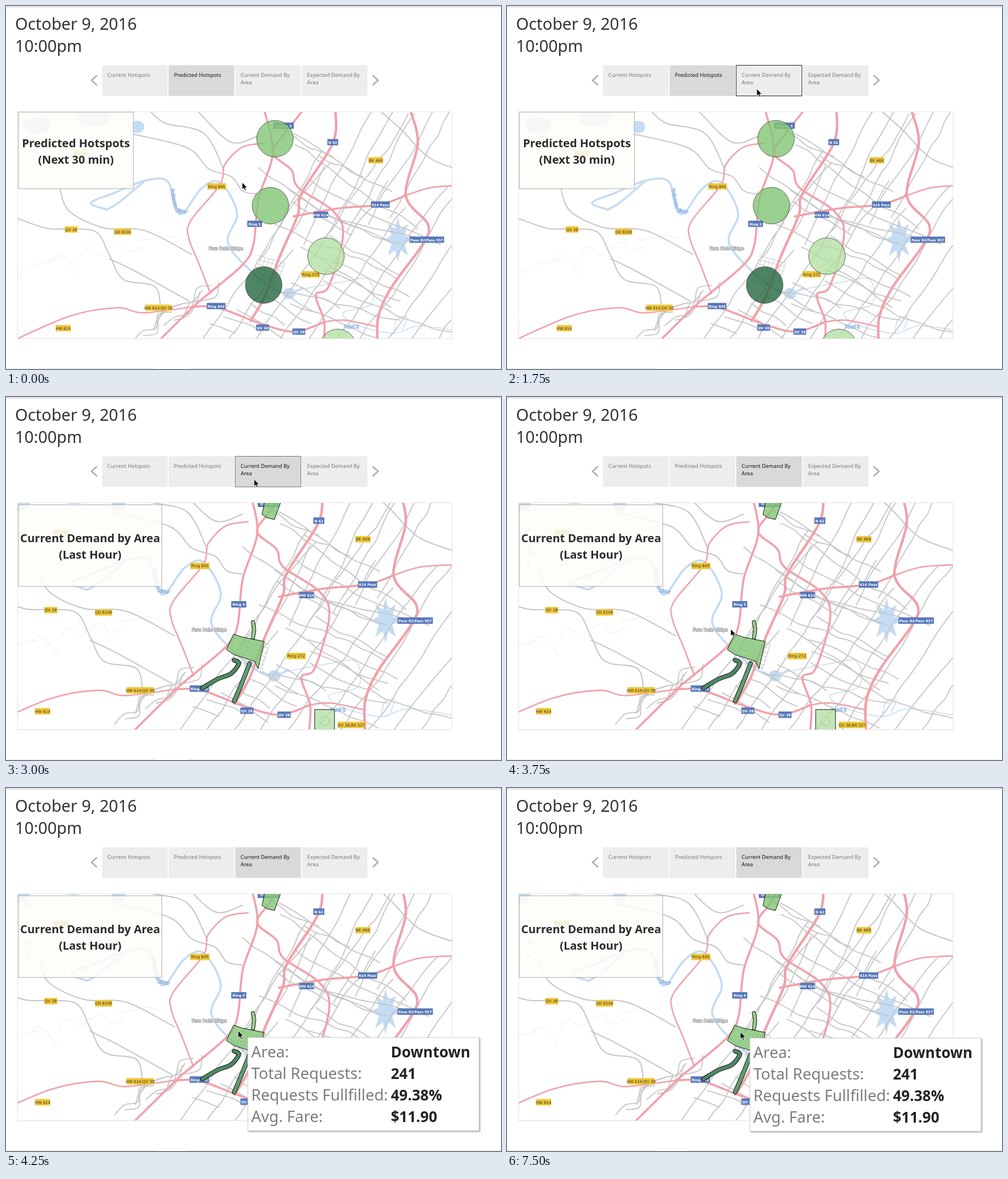
An HTML page that plays this animation: 874 px wide and 640 px high, repeating every 8000 ms.

```html
<!DOCTYPE html>
<html lang="en">
<head>
<meta charset="utf-8">
<title>Demand map</title>
<style>
html, body { margin: 0; width: 100%; height: 100%; overflow: hidden; background: #fff; }
svg { display: block; font-family: "Noto Sans", "Open Sans", sans-serif; }
.line { fill: none; stroke-linecap: round; stroke-linejoin: round; }
.sign, .place { font-family: "DejaVu Sans", sans-serif; text-anchor: middle; }
.place { font-size: 7.6px; fill: #fff; stroke: #999; stroke-width: 1.7px; paint-order: stroke; }
.water { stroke: #7ba6dc; }
.tab { font-size: 9.3px; fill: #777; }
.title { font-size: 20px; font-weight: 600; text-anchor: middle; fill: #2b2b2b; }
.key { font-size: 27.5px; font-weight: 300; fill: #7c7c7c; }
.value { font-size: 26px; font-weight: 600; fill: #222; }
</style>
</head>
<body>
<svg width="874" height="640" viewBox="0 0 874 640">
  <defs>
    <clipPath id="frame"><rect x="21" y="187" width="767" height="399"/></clipPath>
    <linearGradient id="edge" x2="0" y2="1"><stop stop-color="#ddd"/><stop offset="1" stop-color="#fff"/></linearGradient>
    <filter id="shadow"><feDropShadow dx="1.5" dy="1.5" stdDeviation="1.2" flood-opacity=".4"/></filter>
  </defs>
  <rect width="874" height="5" fill="url(#edge)"/>
  <path d="M0 639.5H264M320 639.5H874" stroke="#e4e4e4"/>
  <g font-size="28.8" fill="#333"><text x="16" y="42">October 9, 2016</text><text x="16" y="81">10:00pm</text></g>
  <path class="line" d="M160 123L151 131L160 139M648 123L657 131L648 139" stroke="#adadad" stroke-width="2.4"/>
  <g id="tabs"></g>
  <g clip-path="url(#frame)">
    <g id="map"></g>
    <g id="spots" stroke="#333" stroke-opacity=".75"></g>
    <g id="areas" stroke="#111" stroke-linejoin="round"></g>
  </g>
  <rect x="20.5" y="186.5" width="767" height="400" fill="none" stroke="#e2e2e2"/>
  <g id="tools" fill="none" stroke="#aaa" stroke-width="1.2">
    <circle cx="39" cy="203" r="3.5"/>
    <path d="M36.5 206L33.5 209.5M38.5 230V238M34.5 234H42.5M35 268H41L39 272H37ZM38 272V277M42 273L46 277M46 273L42 277M36.5 293.5L41 297L36.5 300.5Z"/>
  </g>
  <g id="titles"></g>
  <g id="tip"><rect width="408" height="164" fill="#fff" stroke="#ccc" filter="url(#shadow)"/></g>
  <path id="cursor" d="M0 0V12.5L2.9 9.9L5 14.5L7 13.6L5 9.2H8.9Z" stroke="#fff" stroke-width=".8"/>
</svg>
<script>
const $ = id => document.getElementById(id);
const map = $("map"), areas = $("areas");
const blue = "#c4dcf4", grey = "#c6c6c6", pink = "#f1a1aa";

let seed = 11;
const random = (lo, hi) => {
  seed = (seed * 1664525 + 1013904223) % 4294967296;
  return lo + (hi - lo) * seed / 4294967296;
};

function add(parent, tag, attrs, text = "") {
  const el = document.createElementNS("http://www.w3.org/2000/svg", tag);
  for (const k in attrs) el.setAttribute(k, attrs[k]);
  el.textContent = text;
  return parent.appendChild(el);
}

// Smooth path through [x, y] points
function curve(p) {
  let d = "M" + p[0];
  for (let i = 0; i < p.length - 1; i++) {
    const a = p[i - 1] || p[i], b = p[i], c = p[i + 1], e = p[i + 2] || c;
    const pull = (u, v, w) => [0, 1].map(k => u[k] + (w[k] - v[k]) / 6);
    d += `C${pull(b, a, c)} ${pull(c, e, b)} ${c}`;
  }
  return d;
}
const line = (parent, stroke, width, points) =>
  add(parent, "path", { class: "line", d: curve(points), stroke, "stroke-width": width });
const parse = text => text.split(" ").map(s => s.split(",").map(Number));
const road = (stroke, width, text) => line(map, stroke, width, parse(text));

// Street that wanders around one heading, in degrees
function wander(x, y, heading, length, sway = 12, stroke = grey, width = 1.8) {
  const points = [[x, y]];
  for (let s = 0; s < length; s += 24) {
    const a = (heading + random(-sway, sway)) * Math.PI / 180;
    points.push([x += 24 * Math.cos(a), y += 24 * Math.sin(a)]);
  }
  line(map, stroke, width, points);
}

// Water
road(blue, 3.6, "178,359 150,347 190,330 245,308 285,309 300,358 314,364 345,322 378,311 408,365 392,418 440,474 490,507 524,497");
road(blue, 3.6, "178,359 200,346 245,308");
road(blue, 1.5, "520,500 590,487 640,482 645,525 595,541 622,563 685,577 730,564 810,575");
road(blue, 1.5, "685,577 690,553 708,548 700,571");
const lake = Array.from({ length: 16 }, (_, i) => {
  const a = i * Math.PI / 8, r = i % 2 ? 0.5 : 1;
  return [692 + 25 * r * Math.sin(a), 412 - 40 * r * Math.cos(a)];
});
add(map, "polygon", { points: lake.join(" "), fill: blue });
[[232, 213, 12], [55, 210, 24], [155, 197, 30], [500, 507, 11]].forEach(([cx, cy, rx]) =>
  add(map, "ellipse", { cx, cy, rx, ry: Math.min(rx, 16) * .9, fill: blue }));
for (let i = 0; i < 5; i++) wander(25 + i * 52, 470 - i * 14, 8, 70, 65, "#e6eff8", 1);

// Town streets: a slanted grid, then the small downtown blocks
for (let i = 0; i < 10; i++) wander(335 + i * 46, 605, -54, random(190, 500), 9);
for (let i = 0; i < 7; i++) wander(450 + i * 38, 445 - i * 12, -61, random(150, 330), 8);
for (let i = 0; i < 17; i++) wander(random(440, 590), 205 + i * 20, random(15, 32), random(90, 260));
for (let i = 0; i < 7; i++) wander(360 + i * 24, 560 - i * 12, 28, random(40, 110));
for (let i = 0; i < 7; i++) {
  wander(434 + i * 7, 488 + i * 2, -70, 44, 2, grey, 1);
  wander(446 - i * 2, 440 + i * 7, 16, 44, 2, grey, 1);
}

// Country roads
for (let i = 0; i < 6; i++) wander(225 + i * 18, 590 - i * 9, -48, random(60, 130), 40);
["21,375 72,392 115,393 160,399 183,440 207,482 262,494 273,530",
 "95,322 112,362 172,391 245,396 328,438",
 "225,226 320,250 358,287 398,301 418,326 445,332",
 "256,187 282,207 350,225 385,290",
 "340,187 397,240 445,229",
 "183,446 229,468 323,520",
 "663,187 700,220 748,268 810,292"].forEach(text => road(grey, 2, text));

// Highways
["455,242 417,249 386,280 378,315 326,379 323,410 341,455 361,507",
 "10,591 115,546 197,532 243,541 331,530",
 "562,557 599,554 657,566", "706,334 751,320 810,316"].forEach(text => road(pink, 2.5, text));
["457,187 471,260 446,340 437,420 418,456 358,507 331,530 255,605",
 "522,187 488,230 471,260 504,289 516,320 578,362 595,405 570,494 547,510 562,557 560,605",
 "331,530 375,532 450,560 510,574 562,557",
 "508,371 585,357 660,350 706,334"].forEach(text => road(pink, 3.6, text));
["582,187 577,242 522,330 515,369 482,445 458,510 432,555",
 "715,187 727,243 706,334 745,385 735,421 680,497 657,550 657,605"].forEach(text => road(pink, 4.4, text));

// Road signs and places
function sign(x, y, name, isBlue) {
  const w = name.length * 3.5 + 5, g = add(map, "g", { class: "sign" });
  add(g, "rect", { x: x - w / 2, y: y - 5.5, width: w, height: 11, fill: isBlue ? "#5577b8" : "#f0c637" });
  add(g, "text", { x, y: y + 2.5, fill: isBlue ? "#fff" : "#333", "font-size": isBlue ? 6 : 6.8, "font-weight": isBlue ? 700 : 400 }, name);
  return g;
}
[[372, 318, "Ring 845"], [115, 394, "QV 38"], [206, 398, "GD 8106"], [653, 272, "BK 469"], [538, 473, "Ring 272"],
 [269, 532, "HW 614;QV 38"], [101, 568, "HW 614"], [132, 260, "GD 731"]].forEach(s => sign(...s));
[[490, 211, "Transit 5"], [577, 240, "N 62"], [439, 384, "Ring 5"], [556, 368, "HW 614"], [661, 350, "614 Pass"],
 [743, 412, "Pass 82/Pass 957"], [371, 529, "Ring 845"], [453, 567, "QV 38"], [517, 574, "QV 38"]].forEach(s => sign(...s, true));
const lateSign = sign(633, 591.5, "QV 38;BK 527");
const place = (name, where, kind = "") => add(map, "text", { class: "place " + kind, transform: where }, name);
place("Fern Dale Ridge", "translate(388 430)");
place("Pond 2", "translate(610 568)", "water");
place("Belmarra", "translate(294 340) rotate(78)", "water");
place("River", "translate(309 364) rotate(10)", "water");

// Marks: hotspots in the first view, areas in the second
const green = "#83c675", pale = "#b4e0a5", dark = "#24683f";
[[475, 234, green], [467, 352, green], [565, 441, pale], [455, 492, dark], [586, 602, pale]].forEach(([cx, cy, fill]) =>
  add($("spots"), "circle", { cx, cy, r: 32.3, fill, "fill-opacity": .8 }));

function ribbon(fill, width, text) {
  line(areas, "#111", width + 2, parse(text));
  line(areas, fill, width, parse(text));
}
ribbon("#9acf8e", 5, "436,424 438,410 436,397");
ribbon("#4f8664", 6, "403,464 411,470 397,488 374,497 347,513");
ribbon("#5f9c71", 6, "430,470 417,503 403,536");
[[green, "458,180 452,207 461,213 474,216 487,180"],
 [green, "402,418 416,423 456,431 445,479 439,466 402,454 389,445"],
 [pale, "545,551 580,551 580,590 545,590"]].forEach(([fill, points]) =>
  add(areas, "polygon", { points, fill, "fill-opacity": .8 }));
add(areas, "circle", { cx: 562, cy: 571, r: 8, fill: "none", stroke: "#a4cc98" });

// Tabs, headings and tooltip
const tabs = ["Current Hotspots", "Predicted Hotspots", "Current Demand By|Area", "Expected Demand By|Area"].map((label, i) => {
  const x = 169.5 + i * 117.6, g = add($("tabs"), "g", { class: "tab" });
  const box = add(g, "rect", { x, y: 104.5, width: 116, height: 54 });
  label.split("|").forEach((s, row) => add(g, "text", { x: x + 9.5, y: 125 + row * 13 }, s));
  return { g, box };
});
const titles = [["Predicted Hotspots", "(Next 30 min)", 187, 203, 135], ["Current Demand by Area", "(Last Hour)", 190, 253, 144]]
  .map(([top, bottom, y, width, height]) => {
    const g = add($("titles"), "g", {}), x = 22 + width / 2, mid = y + height / 2;
    add(g, "rect", { x: 22, y, width, height, fill: "#fdfdf8", "fill-opacity": .87, stroke: "#aaa" });
    add(g, "text", { x, y: mid - 6, class: "title" }, top);
    add(g, "text", { x, y: mid + 23, class: "title" }, bottom);
    return g;
  });
[["Area:", "Downtown"], ["Total Requests:", "241"], ["Requests Fullfilled:", "49.38%"], ["Avg. Fare:", "$11.90"]].forEach(([key, value], i) => {
  add($("tip"), "text", { x: 6, y: 35 + i * 38, class: "key" }, key);
  add($("tip"), "text", { x: 252.5, y: 35 + i * 38, class: "value" }, value);
});

// Keys: time, x, y
const pointer = [[0, 417, 311], [250, 400, 325], [500, 394, 322], [750, 412, 226], [1000, 437, 152], [1250, 441, 146],
  [3000, 438, 145], [3250, 430, 167], [3500, 403, 345], [3750, 395, 409], [4000, 406, 425], [4250, 410, 428], [4500, 412, 430]];
const tips = [[4000, 415, 432], [4250, 427, 440], [4500, 429, 441]];
const at = (keys, t) => keys.findLast(k => k[0] <= t);
const show = (el, on) => { el.style.display = on ? "" : "none"; };
const move = (el, key) => el.setAttribute("transform", `translate(${key[1]} ${key[2]})`);

function draw(now) {
  const t = now % 8000, second = t >= 2000;
  map.setAttribute("transform", second ? "translate(-38.8 -27.9) scale(1.0245)" : "");
  show($("spots"), !second);
  show(areas, second);
  show(lateSign, second);
  titles.forEach((g, i) => show(g, second === !!i));
  show($("tools"), t >= 500 && t < 1000 || t >= 3500);
  tabs.forEach(({ g, box }, i) => {
    const active = i === (second ? 2 : 1), hover = i === 2 && t >= 1000 && t < 3250;
    box.setAttribute("fill", active ? "#d9d9d9" : "#ededed");
    box.setAttribute("stroke", hover ? (t >= 1750 && !second ? "#222" : "#777") : "none");
    g.style.fill = active ? "#111" : "";
  });
  move($("cursor"), at(pointer, t));
  const tip = at(tips, t);
  show($("tip"), tip);
  if (tip) move($("tip"), tip);
  requestAnimationFrame(draw);
}
draw(performance.now());
</script>
</body>
</html>
```
